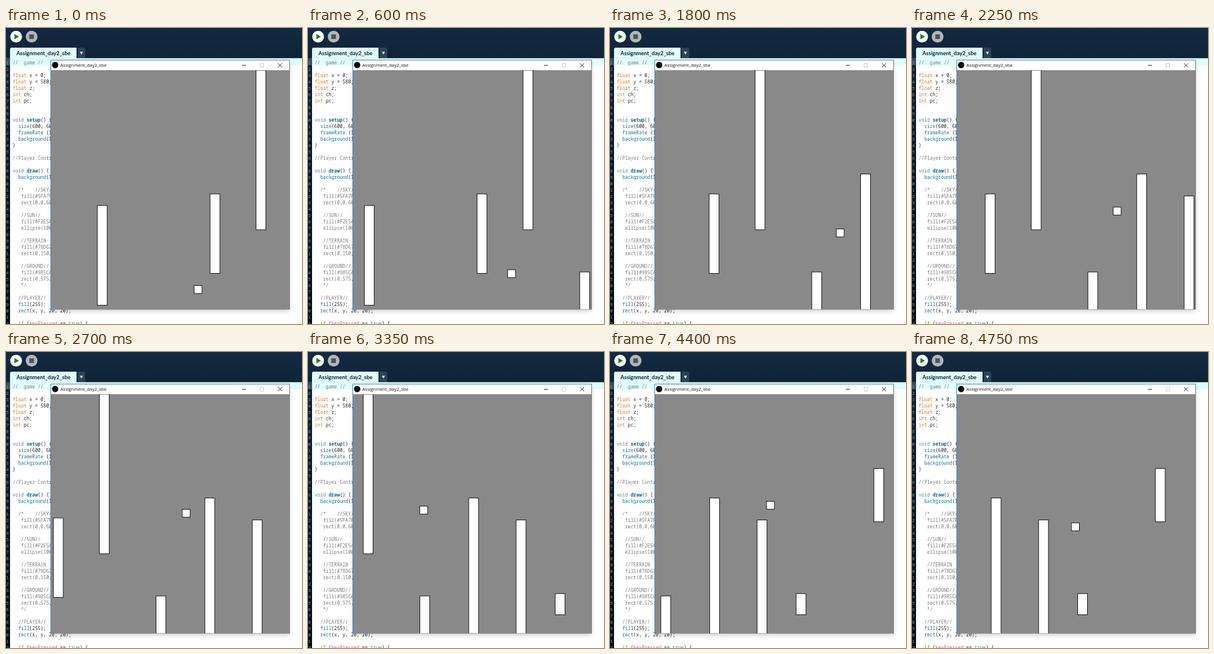
An HTML page for the animation above (4800 ms loop, 512 by 512 pixels).

```html
<!DOCTYPE html>
<html lang="en">
<head>
<meta charset="utf-8">
<title>Obstacle game</title>
<style>
html, body { margin: 0; width: 100%; height: 100%; overflow: hidden; background: #fff; }
svg { display: block; width: 100vw; height: 100vh; }
text { white-space: pre; }
#code, #nums { font: 8.06px "Noto Sans Mono", monospace; fill: #2a2a2a; }
#nums { font-size: 7.5px; fill: #8496a3; }
.type { fill: #d9772f; }
.void { fill: #3f9a90; }
.main { fill: #006699; font-weight: 700; }
.call { fill: #1a7099; }
.flow { fill: #7a9a2a; }
.key { fill: #d0638a; }
.note { fill: #7c7c7c; }
#game rect { fill: #fff; stroke: #111; stroke-width: 1; }
</style>
</head>
<body>
<svg viewBox="0 0 512 512">
  <defs>
    <linearGradient id="navy" x2="0" y2="1">
      <stop offset="0" stop-color="#132a40"/>
      <stop offset="1" stop-color="#0f2437"/>
    </linearGradient>
    <linearGradient id="gutter" x2="0" y2="1">
      <stop offset="0" stop-color="#0e2133"/>
      <stop offset="1" stop-color="#060d14"/>
    </linearGradient>
    <filter id="soft" x="-10%" y="-10%" width="120%" height="120%">
      <feGaussianBlur stdDeviation="4"/>
    </filter>
    <clipPath id="view"><rect x="78" y="73" width="412" height="413.5"/></clipPath>
  </defs>

  <rect width="512" height="512" fill="#fff"/>
  <rect width="512" height="52.5" fill="url(#navy)"/>
  <rect y="52.5" width="7" height="459.5" fill="url(#gutter)"/>
  <rect y="53.5" width="7" height="11" fill="#3c4f5e"/>
  <rect x="7" y="52.5" width="505" height="12" fill="#e0fcfd"/>

  <circle cx="17.5" cy="15" r="10.2" fill="#fff"/>
  <path d="M14.5 10.2L22.3 15L14.5 19.8Z" fill="#0a8a0a"/>
  <circle cx="44.3" cy="15" r="10.2" fill="#b1b6ba"/>
  <rect x="40.3" y="11" width="8" height="8" fill="#4b535b"/>

  <path d="M7 53V37q0-3 3-3H122V53Z" fill="#e0fcfd"/>
  <text x="18" y="46.5" font-family="Lato, sans-serif" font-size="9.5" font-weight="700" fill="#10202e">Assignment_day2_sbe</text>
  <path d="M124 52V34H134q3 0 3 3V52Z" fill="#2d4356"/>
  <path d="M128 41H133L130.5 46Z" fill="#fff"/>

  <g id="nums"></g>
  <g id="code"></g>

  <rect x="79" y="61" width="411" height="428" fill="#000" opacity=".22" filter="url(#soft)"/>
  <rect x="77.5" y="55.5" width="413" height="431.2" fill="#fff" stroke="#4386ba"/>
  <circle cx="85" cy="64" r="5.5" fill="#0a0a0a"/>
  <text x="94" y="67" font-family="Open Sans, sans-serif" font-size="7.8" fill="#111">Assignment_day2_sbe</text>
  <path d="M408 64.5H415" stroke="#222"/>
  <rect x="439.5" y="61.5" width="6" height="6" fill="none" stroke="#ccc"/>
  <path d="M470.5 61L477.5 68M477.5 61L470.5 68" stroke="#222" fill="none"/>
  <rect x="78" y="73" width="412" height="413.2" fill="#898989"/>
  <g id="game" clip-path="url(#view)"></g>
</svg>
<script>
const NS = "http://www.w3.org/2000/svg";
const el = id => document.getElementById(id);

function add(parent, tag, attrs, text) {
  const node = document.createElementNS(NS, tag);
  for (const k in attrs) node.setAttribute(k, attrs[k]);
  if (text) node.textContent = text;
  return parent.appendChild(node);
}

const source = `//  game //

float x = 0;
float y = 580;
float z;
int ch;
int pc;


void setup() {
  size(600, 600);
  frameRate (10);
  background(100);
}

//Player Control

void draw() {
  background(100);

  /*    //SKY//
   fill(#5FA7FF);
   rect(0,0,600);

   //SUN//
   fill(#F2E545);
   ellipse(100,1);

   //TERRAIN
   fill(#78D670);
   rect(0,150,6);

   //GROUND//
   fill(#985C40);
   rect(0,575,6);
   */

  //PLAYER//
  fill(255);
  rect(x, y, 20, 20);

  if (keyPressed == true) {`.split("\n");

const rules = [
  ["type", /^(float|int)$/],
  ["void", /^(void|true)$/],
  ["main", /^(setup|draw)$/],
  ["call", /^(size|frameRate|background|fill|rect)$/],
  ["flow", /^if$/],
  ["key", /^keyPressed$/]
];

let inNote = false;
source.forEach((line, i) => {
  const y = 62.5 + i * 11;
  add(el("nums"), "text", { x: 0.3, y }, String((i + 1) % 10));
  const row = add(el("code"), "text", { x: 11.5, y });
  if (line.includes("/*")) inNote = true;
  if (inNote || line.trim().startsWith("//")) {
    add(row, "tspan", { class: "note" }, line);
  } else {
    for (const word of line.match(/\w+|\W+/g) || []) {
      const rule = rules.find(r => r[1].test(word));
      add(row, "tspan", rule ? { class: rule[0] } : {}, word);
    }
  }
  if (line.includes("*/")) inNote = false;
});

// Obstacles: offset from the scrolling base, top, bottom
const bars = [
  [-274.5, 307, 479.5], [-79.5, 287, 424.5], [0, 73, 349], [98, 422, 500],
  [182.5, 252.5, 500], [264.5, 290.5, 500], [332, 418, 454.5], [466.5, 201.5, 293.7]
].map(([dx, top, end]) => ({
  dx,
  node: add(el("game"), "rect", { y: top, width: 17, height: end - top })
}));
const player = add(el("game"), "rect", { width: 13.7, height: 13.7 });

// Time, scroll base, player x, player y
const path = [
  [0, 432, 325, 445.5], [1200, 311, 365, 390.5], [1800, 250.5, 391, 347.5],
  [2700, 161, 304.5, 272], [3350, 95, 193, 266.5], [4000, 30, 264.5, 215.5],
  [4750, -46, 275.5, 295.5]
];

function stateAt(t) {
  let i = 0;
  while (i < path.length - 2 && t >= path[i + 1][0]) i++;
  const a = path[i], b = path[i + 1];
  const k = (t - a[0]) / (b[0] - a[0]);
  return a.map((v, j) => v + (b[j] - v) * k);
}

function draw(ms) {
  const t = Math.floor(ms % 4800 / 50) * 50;
  const [, base, px, py] = stateAt(t);
  for (const b of bars) b.node.setAttribute("x", base + b.dx + .5);
  player.setAttribute("x", px + .3);
  player.setAttribute("y", py + .1);
}

const start = performance.now();
function tick() {
  draw(performance.now() - start);
  requestAnimationFrame(tick);
}
tick();
</script>
</body>
</html>
```
